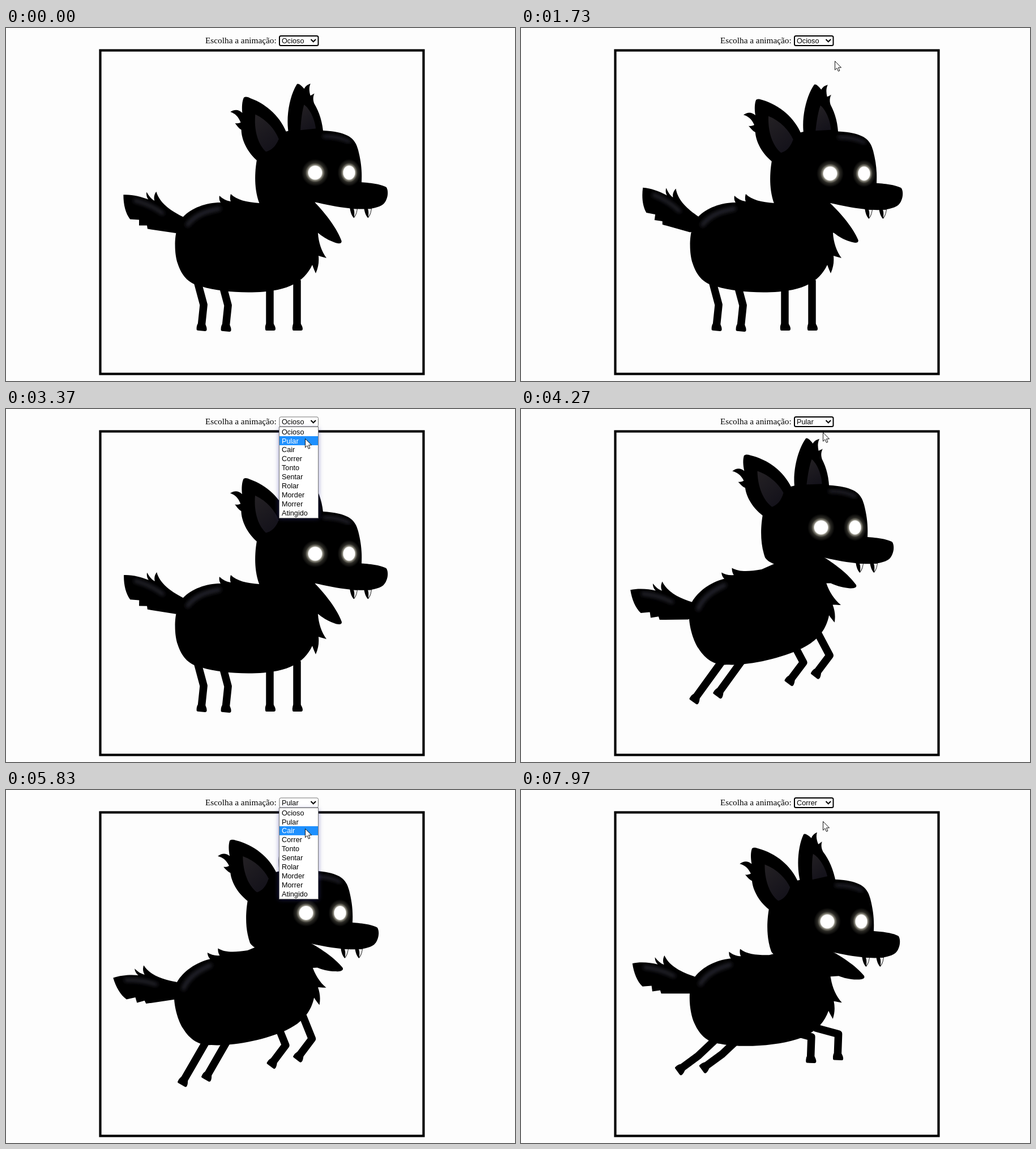
An HTML page for the animation above (8000 ms loop, 899 by 623 pixels).

```html
<!DOCTYPE html>
<html lang="pt">
<head>
<meta charset="utf-8">
<title>Animação</title>
<style>
  html, body { margin: 0; width: 100%; height: 100%; overflow: hidden; background: #fdfdfd; }
  svg { display: block; width: 899px; height: 623px; }
  .label { font: 15.3px "Liberation Serif", "Times New Roman", serif; }
  .ui { font: 12.7px "Liberation Sans", Arial, sans-serif; }
  .shine { fill: none; stroke: #24222a; stroke-linecap: round; filter: url(#soft); }
</style>
</head>
<body>
<svg viewBox="0 0 899 623">
  <defs>
    <filter id="soft" x="-50%" y="-50%" width="200%" height="200%"><feGaussianBlur stdDeviation="3"/></filter>
    <filter id="shade" x="-40%" y="-20%" width="180%" height="140%"><feGaussianBlur stdDeviation="4"/></filter>
    <radialGradient id="eye">
      <stop offset=".48" stop-color="#fff"/>
      <stop offset=".56" stop-color="#8a887c"/>
      <stop offset=".72" stop-color="#2c2b26"/>
      <stop offset="1" stop-color="#000"/>
    </radialGradient>
    <linearGradient id="inner" x1="0" y1="0" x2=".4" y2="1">
      <stop offset="0" stop-color="#242124"/>
      <stop offset="1" stop-color="#15131b"/>
    </linearGradient>
    <path id="foot" d="M-8 4Q-9-3-6-7L6-7Q10-1 10 3Q10 6 7 6H-6Q-8 6-8 4Z" fill="#000" stroke="none"/>
    <g id="fang">
      <path d="M607 315C608 325 611 332 614.500 335C618 331 621 324 621 315Z"/>
      <path d="M614 319C616 324 615 329 615 333C618 329 619.500 324 620 319Z" fill="#eee"/>
    </g>
  </defs>

  <rect x="166.500" y="39.500" width="571" height="571" fill="#fdfdfd" stroke="#000" stroke-width="4.200"/>

  <g id="legs" fill="none" stroke="#000" stroke-width="13.500" stroke-linejoin="round"></g>

  <g id="body">
    <g id="tail">
      <path d="M207 295C222 294 238 298 251 303C248 299 247 294 248 290C252 297 256 302 262 305C260 299 262 293 265 289C271 309 290 322 312 333L330 350L300 362L250 355L249 349L235 349L235 339L219 338C211 328 207 312 207 295Z"/>
      <path class="shine" stroke-width="7" d="M228 305Q255 312 276 327"/>
    </g>
    <path d="M447 309C425 307 408 304 397 293C395 299 396 304 397 306C389 305 382 301 377 296C376 301 377 305 379 308C352 308 328 318 313 333C296 350 296 395 303 415C311 440 325 452 345 456C380 467 440 470 480 462C505 457 528 445 541 418C543 424 545 428 547 433C552 422 553 412 552 402C556 403 561 405 566 406C557 394 552 378 551 362L545 300L480 304Z"/>
    <path class="shine" stroke-width="8" d="M321 347Q336 326 376 319"/>
  </g>

  <g id="head">
    <g id="earR">
      <path d="M513 99C515 97 520 100 526 107C528 103 531 100 537 98C534 105 535 112 537 119C539 118 541 117 544 115C541 122 542 128 544 133C553 148 559 165 561 190L500 190C493 160 500 120 513 99Z"/>
      <path fill="url(#inner)" d="M526 135C536 142 545 160 547 177L520 180C521 160 523 145 526 135Z"/>
    </g>
    <path id="jaw" d="M500 305L545 307C565 328 585 355 592 376C593 382 585 381 578 378C565 373 557 367 550 361L495 345Z"/>
    <use href="#fang"/><use href="#fang" x="25"/>
    <path d="M447 308C437 280 440 250 443 232C455 200 480 185 500 181C530 181 550 179 575 182C605 186 617 195 622 215C627 235 629 250 628 272C645 273 665 276 672 281C677 290 673 305 666 311C655 319 635 321 607 318C585 316 565 311 545 307C530 330 460 330 447 308Z"/>
    <path class="shine" stroke-width="6" d="M562 191Q588 191 606 200"/>
    <g id="earL">
      <path d="M421 122C424 120 428 121 432 123C462 134 487 158 497 188L480 235L445 235C425 218 416 195 416 179C411 176 408 171 405 167C410 168 413 167 415 166C411 155 405 150 397 147C405 142 412 143 418 149C417 138 418 128 421 122Z"/>
      <path fill="url(#inner)" d="M441 152C462 162 476 180 482 196C476 210 468 216 459 218C445 205 438 180 441 152Z"/>
    </g>
    <circle cx="546" cy="255" r="24" fill="url(#eye)"/>
    <ellipse cx="606" cy="255" rx="20.500" ry="24" fill="url(#eye)"/>
  </g>

  <text class="label" x="352" y="27">Escolha a animação:</text>
  <rect id="field" x="483" y="14" width="68.500" height="17" rx="2.500" fill="#fff"/>
  <text id="value" class="ui" x="487" y="27"></text>
  <path d="M538.500 20l4.300 4.300 4.300-4.300" fill="none" stroke="#000" stroke-width="2"/>

  <g id="list" class="ui">
    <rect x="482" y="34" width="70" height="159" fill="#3c3ca0" opacity=".5" filter="url(#shade)"/>
    <rect x="482.500" y="31.500" width="69" height="161" fill="#fff" stroke="#777"/>
    <rect id="mark" x="483" width="68" height="16" fill="#1e90ff"/>
  </g>

  <path id="cursor" d="M.5.5V16L4 12.700 6.400 18.300 8.900 17.200 6.500 11.800H11.500Z" fill="#fff" stroke="#111"/>
</svg>

<script>
const LOOP = 8000, ROW = 15.94, LIST_TOP = 32, RAD = Math.PI / 180;
const NAMES = ["Ocioso", "Pular", "Cair", "Correr", "Tonto", "Sentar", "Rolar", "Morder", "Morrer", "Atingido"];
const $ = id => document.getElementById(id);
function set(node, attrs) {
  for (const key in attrs) node.setAttribute(key, attrs[key]);
}
function make(tag, attrs, parent) {
  const node = document.createElementNS("http://www.w3.org/2000/svg", tag);
  set(node, attrs);
  return parent.appendChild(node);
}

// Angles are in degrees; hind and fore hold the upper and lower leg.
// swing, bob and stride say how far the pose moves away and back in each period.
const ACTIONS = [
  { at: 650, period: 700, swing: 1, bob: 2, stride: 0,
    lift: 0, tilt: 0, head: [0, 0], tail: -1, earL: 0, earR: 0, jaw: 0, hind: [-15, 6], fore: [0, 0] },
  { at: 4270, period: 624, swing: -0.8, bob: 8, stride: -6,
    lift: 23, tilt: -15, head: [-16, -46], tail: -8.7, earL: -7, earR: 4, jaw: -16, hind: [36, 36], fore: [-28, 37] },
  { at: 6770, period: 600, swing: -0.4, bob: 3, stride: 0,
    lift: 19, tilt: 15, head: [18, 12], tail: 10.6, earL: -7, earR: 0, jaw: -21, hind: [61, 134], fore: [-54, -23] },
  { at: 7970, period: 420, swing: 1, bob: 12, stride: -60,
    lift: 16, tilt: -6, head: [-5, -23], tail: -8, earL: -5, earR: -6, jaw: -20, hind: [47, 54], fore: [-75, 2] }
];
const CENTRE = [425, 387];
const HIPS = { hind: [[338, 447], [381, 448]], fore: [[466, 445], [514, 445]] };
const UPPER = 43, LOWER = 40;

const PICKS = [
  { open: 2300, click: 3650, entry: 1, restY: 41 },
  { open: 4880, click: 5890, entry: 2, restY: 50 },
  { open: 6720, click: 7590, entry: 3, restY: 55 }
];
const ARROW = [542, 21];
const trail = [{ t: 40, to: [873, 380] }, { t: 950, to: [554, 58] }];
for (const { open, click, entry, restY } of PICKS) {
  const row = [528, LIST_TOP + (entry + 0.25) * ROW];
  trail.push(
    { t: open - 480, to: trail.at(-1).to },
    { t: open - 150, to: ARROW }, { t: open + 180, to: ARROW },
    { t: open + 620, to: row }, { t: click + 60, to: row },
    { t: click + 330, to: [533, restY] }
  );
}

const legs = Object.entries(HIPS).flatMap(([pair, hips]) => hips.map(hip => ({
  pair, hip,
  bone: make("path", {}, $("legs")),
  foot: make("use", { href: "#foot" }, $("legs"))
})));
const rows = NAMES.map((name, i) => {
  const row = make("text", { x: 487, y: 44.6 + i * ROW }, $("list"));
  row.textContent = name;
  return row;
});

const turn = (id, angle, x, y) => set($(id), { transform: `rotate(${angle} ${x} ${y})` });
const reach = ([x, y], angle, length) => [x - length * Math.sin(angle * RAD), y + length * Math.cos(angle * RAD)];

function onBody([x, y], dx, dy, tilt) {
  const u = x - CENTRE[0], v = y - CENTRE[1], c = Math.cos(tilt * RAD), s = Math.sin(tilt * RAD);
  return [CENTRE[0] + dx + u * c - v * s, CENTRE[1] + dy + u * s + v * c];
}

function drawDog(pose, t) {
  const phase = (((t - pose.at) / pose.period) % 1 + 1) % 1;
  const k = 1 - Math.abs(1 - 2 * phase);
  const swing = pose.swing * k, stride = pose.stride * k;
  const tilt = pose.tilt - stride * 0.2, dx = -Math.abs(tilt) / 15, dy = -pose.lift;
  const angles = {
    hind: pose.hind.map(a => a + stride),
    fore: [pose.fore[0] - stride, pose.fore[1]]
  };

  set($("body"), { transform: `translate(${dx} ${dy}) rotate(${tilt} ${CENTRE})` });
  set($("head"), { transform: `translate(${pose.head[0]} ${pose.head[1] + pose.bob * k})` });
  turn("tail", pose.tail + 9.5 * swing - tilt, 310, 350);
  turn("earL", pose.earL - 4 * swing - 3 * Math.min(k, -swing) * (swing < 0), 465, 215);
  turn("earR", pose.earR + 3.5 * swing, 530, 185);
  turn("jaw", pose.jaw - 3.5 * k, 530, 310);

  for (const { pair, hip, bone, foot } of legs) {
    const [upper, lower] = angles[pair];
    const top = onBody(hip, dx, dy, tilt);
    const knee = reach(top, upper, UPPER), ankle = reach(knee, lower, LOWER);
    set(bone, { d: `M${top}L${knee}L${ankle}` });
    set(foot, { transform: `translate(${ankle}) rotate(${lower})` });
  }
}

function cursorAt(t) {
  const next = trail.findIndex(p => p.t > t);
  if (next < 1) return trail.at(next && -1).to;
  const from = trail[next - 1], goal = trail[next];
  const k = (t - from.t) / (goal.t - from.t), ease = k * k * (3 - 2 * k);
  return from.to.map((v, i) => v + (goal.to[i] - v) * ease);
}

function drawMenu(t, action, [x, y]) {
  const open = PICKS.some(p => t >= p.open && t < p.click);
  const hover = y >= LIST_TOP ? Math.floor((y - LIST_TOP) / ROW) : action;
  set($("field"), open ? { stroke: "#777", "stroke-width": 1 } : { stroke: "#000", "stroke-width": 2 });
  $("value").textContent = NAMES[action];
  set($("list"), { visibility: open ? "visible" : "hidden" });
  set($("mark"), { y: LIST_TOP + hover * ROW });
  rows.forEach((row, i) => set(row, { fill: i === hover ? "#fff" : "#000" }));
  set($("cursor"), { transform: `translate(${x} ${y})`, visibility: t < trail[0].t ? "hidden" : "visible" });
}

function draw(t) {
  const action = PICKS.reduce((now, p) => t >= p.click ? p.entry : now, 0);
  drawDog(ACTIONS[action], t);
  drawMenu(t, action, cursorAt(t));
}

const start = performance.now();
function tick() {
  draw((performance.now() - start) % LOOP);
  requestAnimationFrame(tick);
}
tick();
</script>
</body>
</html>
```
